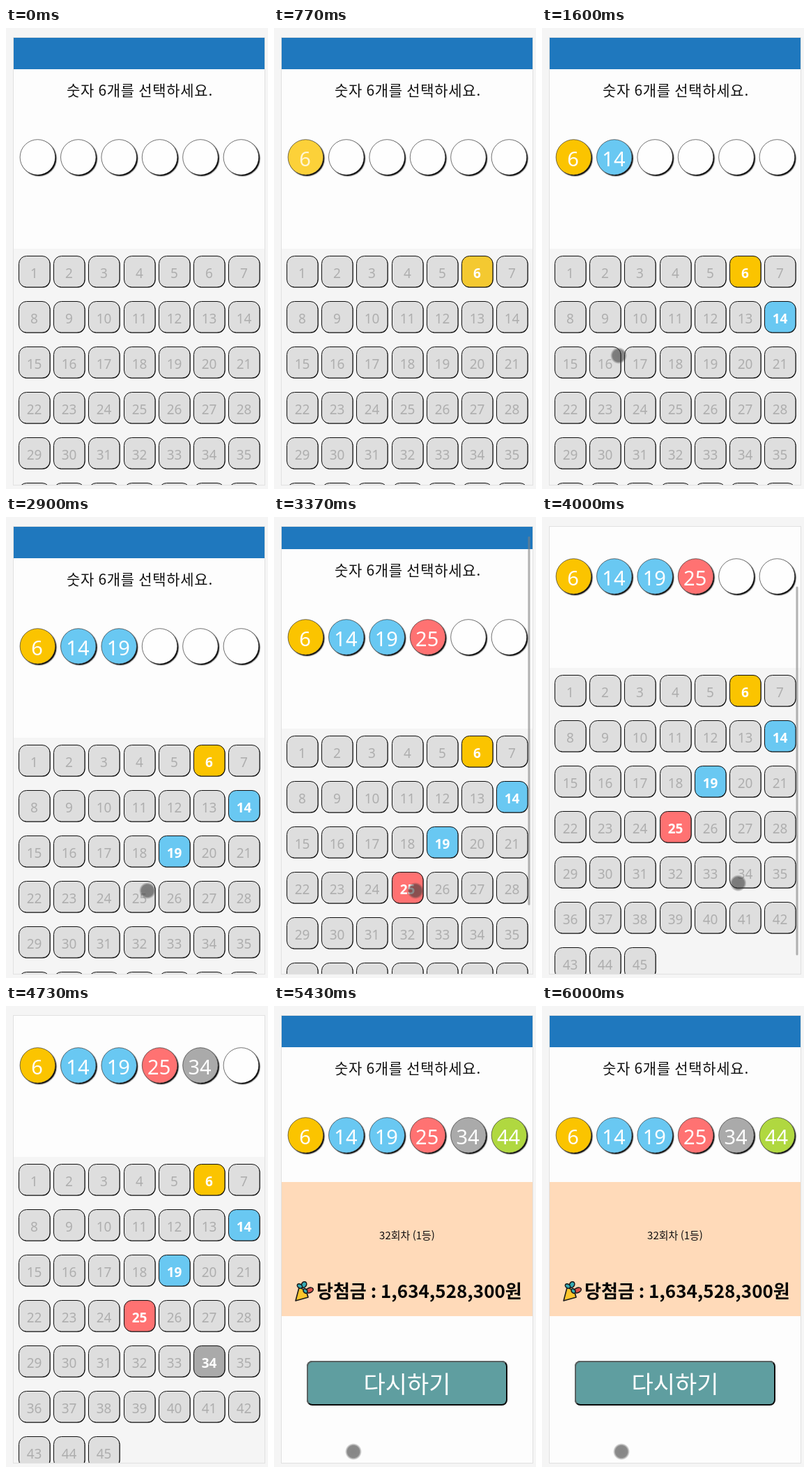
An HTML page with a canvas for the animation above (6030 ms loop, 376 by 660 pixels).

```html
<!DOCTYPE html>
<html lang="ko">
<head>
<meta charset="utf-8">
<title>숫자 선택</title>
<style>
html, body { margin: 0; width: 100%; height: 100%; overflow: hidden; background: #f5f5f5; }
canvas { display: block; width: 376px; height: 660px; }
</style>
</head>
<body>
<canvas id="stage" width="376" height="660"></canvas>
<script>
const ctx = document.getElementById('stage').getContext('2d');
const LOOP = 6030;
const RESULT_AT = 5385;
const KR = '"Noto Sans CJK KR", "Noto Sans CJK", sans-serif';
const DIGITS = '"Noto Sans", "Open Sans", sans-serif';
const VIEW = { x: 11, y: 14, w: 360, h: 640 };
const PAPER = '#fdfdfd';
const SMOKE = '#f5f5f5';

// number, time of the tap, length of the colour change
const PICKS = [
  { n: 6, at: 670, dur: 130, color: '#fbc400' },
  { n: 14, at: 1040, dur: 170, color: '#69c8f2' },
  { n: 19, at: 1950, dur: 130, color: '#69c8f2' },
  { n: 25, at: 3040, dur: 130, color: '#ff7272' },
  { n: 34, at: 4570, dur: 150, color: '#aaaaaa' },
  { n: 44, at: 4870, dur: 150, color: '#b0d840', ballOnly: true }
];

// pointer tracks: [time, x, y]
const TRACKS = [
  { from: 30, to: 480, keys: [[30, 368, 440], [230, 271, 361]] },
  { from: 1590, to: 4640, keys: [
    [1600, 110, 469], [1920, 240, 482], [2230, 240, 482], [2830, 203, 535],
    [3400, 203, 535], [3500, 204, 527], [4100, 286, 524]] },
  { from: RESULT_AT, to: LOOP, keys: [[RESULT_AT, 114, 638]] }
];

const clamp = v => Math.max(0, Math.min(1, v));
const ease = p => p < 0.5 ? 2 * p * p : 1 - 2 * (1 - p) * (1 - p);
const progress = (t, start, dur) => clamp((t - start) / dur);

function text(str, x, y, font, color, align = 'center', spacing = 0) {
  ctx.font = font;
  ctx.fillStyle = color;
  ctx.textAlign = align;
  ctx.letterSpacing = spacing + 'px';
  ctx.fillText(str, x, y);
  ctx.letterSpacing = '0px';
}

function rect(x, y, w, h, color) {
  ctx.fillStyle = color;
  ctx.fillRect(x, y, w, h);
}

function roundPath(x, y, w, h, r) {
  ctx.beginPath();
  ctx.roundRect(x, y, w, h, r);
}

function fill(color, alpha = 1) {
  ctx.globalAlpha = alpha;
  ctx.fillStyle = color;
  ctx.fill();
  ctx.globalAlpha = 1;
}

function ball(i, t) {
  const pick = PICKS[i];
  const x = 45.4 + 58.4 * i;
  const y = 185;
  const p = progress(t, pick.at, pick.dur);
  ctx.beginPath();
  ctx.arc(x, y, 25.3, 0, Math.PI * 2);
  ctx.save();
  ctx.shadowColor = '#000';
  ctx.shadowBlur = 1.5;
  ctx.shadowOffsetX = ctx.shadowOffsetY = 1.7;
  fill('#fefefe');
  ctx.restore();
  if (p) fill(pick.color, p);
  ctx.strokeStyle = 'rgba(20,20,20,.65)';
  ctx.lineWidth = 0.9;
  ctx.stroke();
  if (!p) return;
  ctx.globalAlpha = p;
  text(pick.n, x - 0.9, 198, '400 29px ' + DIGITS, '#fff');
  ctx.globalAlpha = 1;
}

function cell(n, t) {
  const col = (n - 1) % 7;
  const row = Math.floor((n - 1) / 7);
  const x = 18.5 + Math.round(col * 50.2);
  const y = 326.5 + row * 65;
  const pick = PICKS.find(k => k.n === n && !k.ballOnly);
  const p = pick ? progress(t, pick.at, pick.dur) : 0;
  roundPath(x + 0.6, y + 0.6, 44.5, 44.5, 11);
  fill('#000');
  roundPath(x, y, 44.5, 44.5, 11);
  fill('#dedede');
  if (p) fill(pick.color, p);
  ctx.strokeStyle = '#101010';
  ctx.lineWidth = 1;
  ctx.stroke();
  const on = p > 0.5;
  text(n, x + 22, y + 31, (on ? 600 : 400) + ' 19px ' + DIGITS, on ? '#fff' : '#aeaeae');
}

function popper() {
  const blob = (x, y, rx, ry, turn, color) => {
    ctx.beginPath();
    ctx.ellipse(x, y, rx, ry, turn, 0, Math.PI * 2);
    fill(color);
    ctx.stroke();
  };
  ctx.strokeStyle = '#1a1a1a';
  ctx.lineWidth = 1.6;
  ctx.lineJoin = 'round';
  ctx.beginPath();
  ctx.moveTo(31, 422);
  ctx.lineTo(36, 403);
  ctx.quadraticCurveTo(47, 406, 49, 417);
  ctx.closePath();
  fill('#fbc52c');
  ctx.stroke();
  blob(43, 399, 3.5, 4.5, 0.5, '#35aab4');
  blob(37, 401, 4, 2.8, 0.6, '#35aab4');
  blob(51, 407, 5.5, 3.5, -0.4, '#d8504a');
  blob(45, 408, 2.6, 3.6, -0.7, '#35aab4');
}

function result() {
  rect(11, 252, 360, 192, '#ffdab9');
  text('32회차 (1등)', 191, 334, '400 15px ' + KR, '#111');
  popper();
  text('당첨금 : 1,634,528,300원', 61, 418, '700 26px ' + KR, '#050505', 'left');
  roundPath(47, 508, 288, 64, 8);
  fill('#0c0c0c');
  ctx.save();
  ctx.clip();
  ctx.beginPath();
  ctx.moveTo(47, 572);
  ctx.lineTo(55, 564);
  ctx.lineTo(327, 516);
  ctx.lineTo(335, 508);
  ctx.lineTo(47, 508);
  fill('#5a6464');
  ctx.restore();
  roundPath(49, 510, 284, 60, 6);
  fill('#5f9ea0');
  text('다시하기', 191, 554, '400 34px ' + KR, '#fff');
}

function scrollbar(t, scroll) {
  const alpha = progress(t, 3325, 30) * (1 - progress(t, 4080, 290));
  if (!alpha) return;
  roundPath(364.5, 17 + scroll * 0.826, 3, 528, 1.5);
  fill('#808080', alpha * 0.6);
}

function pointer(t) {
  const track = TRACKS.find(k => t >= k.from && t < k.to);
  if (!track) return;
  const keys = track.keys;
  let [, x, y] = keys[0];
  for (let i = 1; i < keys.length; i++) {
    const [t0, x0, y0] = keys[i - 1];
    const [t1, x1, y1] = keys[i];
    if (t < t0) break;
    const p = ease(progress(t, t0, t1 - t0));
    x = x0 + (x1 - x0) * p;
    y = y0 + (y1 - y0) * p;
  }
  const glow = ctx.createRadialGradient(x, y, 0, x, y, 12);
  glow.addColorStop(0, 'rgba(55,55,55,.6)');
  glow.addColorStop(0.72, 'rgba(55,55,55,.58)');
  glow.addColorStop(1, 'rgba(55,55,55,0)');
  ctx.beginPath();
  ctx.arc(x, y, 12, 0, Math.PI * 2);
  fill(glow);
}

function draw(t) {
  const done = t >= RESULT_AT;
  const scroll = done ? 0 : Math.round(100 * ease(progress(t, 3323, 188)));
  rect(0, 0, 376, 660, SMOKE);
  ctx.save();
  ctx.beginPath();
  ctx.rect(VIEW.x, VIEW.y, VIEW.w, VIEW.h);
  ctx.clip();
  rect(VIEW.x, VIEW.y, VIEW.w, VIEW.h, PAPER);
  ctx.translate(0, -scroll);
  rect(11, 14, 360, 45, '#1f78be');
  text('숫자 6개를 선택하세요.', 192, 96.5, '350 21px ' + KR, '#111', 'center', 0.7);
  PICKS.forEach((_, i) => ball(i, t));
  if (done) {
    result();
  } else {
    rect(11, 316, 360, 500, SMOKE);
    for (let n = 1; n <= 45; n++) cell(n, t);
  }
  ctx.translate(0, scroll);
  scrollbar(t, scroll);
  ctx.restore();
  ctx.strokeStyle = 'rgba(120,120,120,.16)';
  ctx.lineWidth = 1;
  ctx.strokeRect(10.5, 13.5, 361, 641);
  pointer(t);
}

const start = performance.now();
function tick() {
  draw((performance.now() - start) % LOOP);
  requestAnimationFrame(tick);
}
tick();
</script>
</body>
</html>
```
